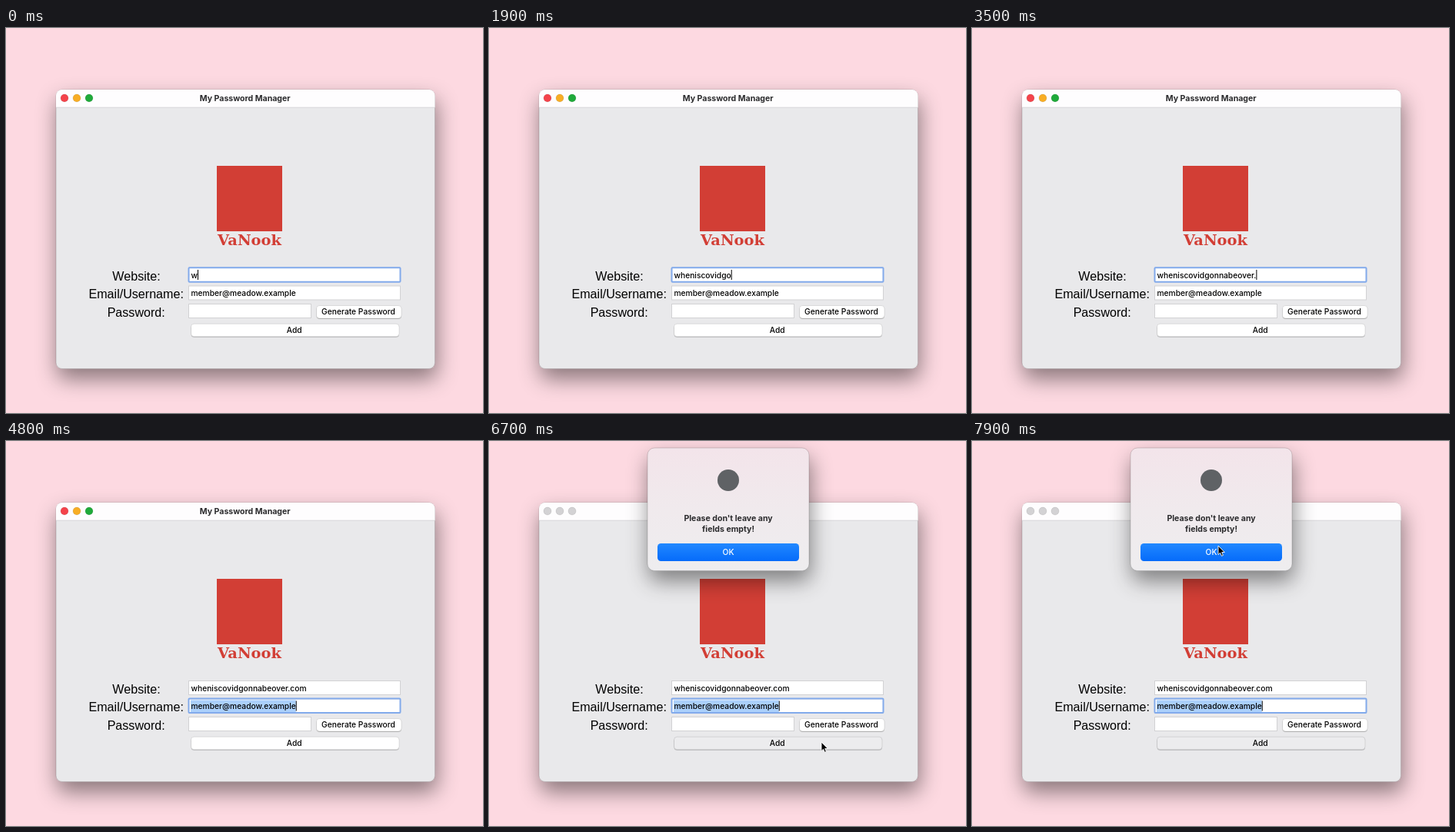
These frames come from a looping animation (620 px wide and 500 px high, 8 s). An HTML page:

```html
<!DOCTYPE html>
<html lang="en">
<head>
<meta charset="utf-8">
<title>My Password Manager</title>
<style>
  html, body { margin: 0; width: 100%; height: 100%; overflow: hidden; background: #fdd9e1; }
  svg { display: block; width: 620px; height: 500px; }
  text { font: 500 10.25px Inter, sans-serif; white-space: pre; }
  .mid { text-anchor: middle; }
  .bold { font-size: 10.55px; font-weight: 700; fill: #2b2b2d; }
  .label { font: 16.1px "Liberation Sans", sans-serif; }
  .brand { font: bold 19.4px "DejaVu Serif", serif; fill: #d23e35; }
  .field { fill: #fff; stroke: #d2d2d4; }
  .button { fill: #fff; stroke: #0002; stroke-width: .8; }
  .button.pressed { fill: #ececee; }
  .ring { fill: none; stroke: #82aaeb; stroke-width: 2; }
  #lights circle { stroke: #0002; stroke-width: .7; }
  .inactive #lights circle { fill: #d3d2d4; }
  .inactive .title { fill: #aaa; }
</style>
</head>
<body>
<svg viewBox="0 0 620 500">
  <defs>
    <filter id="shadow" x="-25%" y="-25%" width="150%" height="160%">
      <feDropShadow dy="13" stdDeviation="14" flood-opacity=".46"/>
    </filter>
    <linearGradient id="glass" x2="0" y2="1">
      <stop stop-color="#f3e4ea"/><stop offset=".5" stop-color="#f0eaed"/><stop offset="1" stop-color="#eeedef"/>
    </linearGradient>
    <linearGradient id="blue" x2="0" y2="1">
      <stop stop-color="#2188ff"/><stop offset="1" stop-color="#056bfa"/>
    </linearGradient>
  </defs>

  <g id="app">
    <rect x="65" y="80" width="492.5" height="362.5" rx="8" fill="#e9e9eb" stroke="#0003" stroke-width=".8" filter="url(#shadow)"/>
    <path d="M65 103V88a8 8 0 0 1 8-8H549.5a8 8 0 0 1 8 8V103Z" fill="#fefdfe"/>
    <path d="M65 103.2H557.5" stroke="#d8d7d9"/>
    <g id="lights">
      <circle cx="76" cy="91" r="5" fill="#f4434b"/>
      <circle cx="92" cy="91" r="5" fill="#f8ae25"/>
      <circle cx="108" cy="91" r="5" fill="#1faa3a"/>
    </g>
    <text class="bold mid title" x="310.7" y="94.5">My Password Manager</text>

    <rect x="274" y="179" width="85" height="85" fill="#d23e35"/>
    <text class="brand mid" x="316.5" y="281.5">VaNook</text>

    <text class="label mid" x="169.5" y="328">Website:</text>
    <text class="label mid" x="169.2" y="351">Email/Username:</text>
    <text class="label mid" x="169.2" y="374.7">Password:</text>

    <rect class="field" x="237.5" y="311.5" width="275" height="18"/>
    <rect class="field" x="237.5" y="335" width="275" height="18"/>
    <rect class="field" x="237.5" y="358.5" width="159" height="18"/>
    <rect id="selection" x="240" y="336.5" height="15.5" fill="#abd0fb"/>
    <text id="website" x="240.5" y="324.6"></text>
    <text id="email" x="240.5" y="348.1">member@meadow.example</text>
    <rect id="ring" class="ring" x="237.5" width="275" height="18.6" rx="1"/>
    <rect id="caret" width="1" height="13"/>

    <rect x="403.5" y="361.5" width="110.5" height="16.5" rx="4" fill="#0003"/>
    <rect class="button" x="403.5" y="360.5" width="110.5" height="16.5" rx="4"/>
    <text class="mid" x="458" y="372.2">Generate Password</text>
    <rect x="240.5" y="385.2" width="270.5" height="16.5" rx="4" fill="#0003"/>
    <rect id="add" class="button" x="240.5" y="384.2" width="270.5" height="16.5" rx="4"/>
    <text class="mid" x="374.7" y="395.7">Add</text>
  </g>

  <g id="dialog">
    <rect x="206" y="9" width="210" height="159.5" rx="9" fill="url(#glass)" stroke="#0003" stroke-width=".8" filter="url(#shadow)"/>
    <circle cx="311" cy="51" r="14" fill="#5f6265"/>
    <text class="bold mid" x="311" y="103.8">Please don't leave any</text>
    <text class="bold mid" x="311" y="117.8">fields empty!</text>
    <rect x="219" y="133" width="184" height="23" rx="4.5" fill="url(#blue)"/>
    <text class="mid" x="311" y="147.8" fill="#fff">OK</text>
  </g>

  <path id="pointer" d="M0 0V11.6L2.6 9.2 4.4 13.3 6.4 12.4 4.7 8.5H8.3Z" stroke="#fff" stroke-width=".9"/>
</svg>

<script>
  const LOOP = 8000, STEP = 100, KEY_DELAY = 157;
  const TAB = 4300, POINTER_SHOWN = 5800, PRESS = 6600, ALERT = 6700;
  const ADDRESS = "wheniscovidgonnabeover.com";
  const POINTER_PATH = [[5700, 568, 78], [6300, 432, 391], [7250, 432, 391], [7900, 320, 136]];

  const $ = id => document.getElementById(id);
  const set = (id, attrs) => Object.entries(attrs).forEach(([name, value]) => $(id).setAttribute(name, value));
  const show = (id, visible) => set(id, { visibility: visible ? "visible" : "hidden" });
  const blink = t => t % 900 < 600;

  function pointerAt(t) {
    const next = POINTER_PATH.findIndex(([time]) => time > t);
    if (next < 0) return POINTER_PATH.at(-1).slice(1);
    const [t0, x0, y0] = POINTER_PATH[Math.max(next - 1, 0)];
    const [t1, x1, y1] = POINTER_PATH[next];
    const p = t1 > t0 ? Math.max(0, (t - t0) / (t1 - t0)) : 0;
    const eased = p * p * (3 - 2 * p);
    return [x0 + (x1 - x0) * eased, y0 + (y1 - y0) * eased];
  }

  function render(t) {
    const onEmail = t >= TAB, alerted = t >= ALERT;
    $("website").textContent = ADDRESS.slice(0, 1 + Math.floor(t / KEY_DELAY));

    const textWidth = $(onEmail ? "email" : "website").getComputedTextLength();
    set("ring", { y: onEmail ? 334.5 : 311.2 });
    set("selection", { width: onEmail ? textWidth + 0.5 : 0 });
    set("caret", { x: 240.5 + textWidth, y: onEmail ? 337.5 : 314 });
    show("caret", alerted || blink(onEmail ? t - TAB : t + 300));

    set("app", { class: alerted ? "inactive" : "" });
    set("add", { class: t >= PRESS ? "button pressed" : "button" });
    show("dialog", alerted);

    show("pointer", t >= POINTER_SHOWN);
    set("pointer", { transform: `translate(${pointerAt(t)})` });
  }

  const start = performance.now();
  function tick() {
    const t = (performance.now() - start) % LOOP;
    render(Math.floor(t / STEP) * STEP);
    requestAnimationFrame(tick);
  }
  tick();
</script>
</body>
</html>
```
